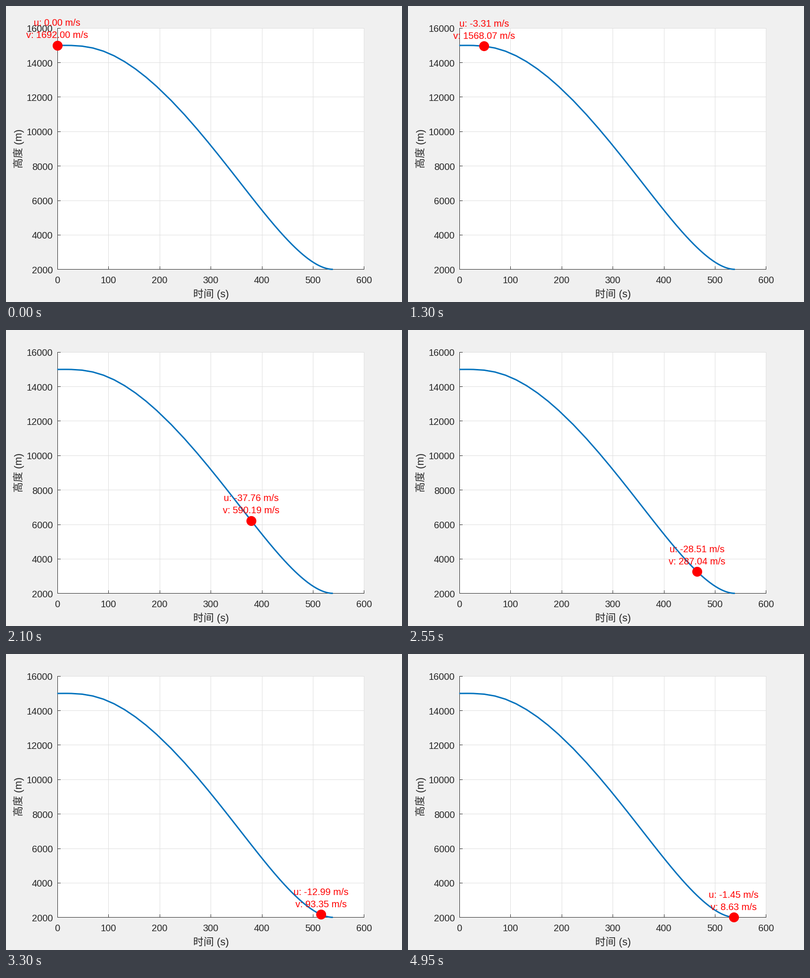
These frames come from a looping animation (840x630 px, 5 s). A matplotlib script:

```python
import matplotlib.pyplot as plt
import numpy as np
from matplotlib.animation import FuncAnimation
from matplotlib.patches import Rectangle

W, H, DPI = 840, 630, 100
PT = 72 / DPI                       # points per pixel
LEFT, RIGHT, TOP, BOTTOM = 108.7, 759.7, 47.25, 560.7
INK, RED, BLUE, GRID = "#262626", "#ff0000", "#0072bd", "#dedede"

plt.rcParams["font.family"] = ["Liberation Sans", "Noto Sans CJK JP"]


def to_x(t):
    return LEFT + (RIGHT - LEFT) * t / 600


def to_y(h):
    return BOTTOM - (BOTTOM - TOP) * (h - 2000) / 14000


def spline(t, kt, kv, first, last):
    """Smooth cubic spline through (kt, kv) with given end slopes."""
    span = np.diff(kt)
    chord = np.diff(kv) / span
    a, b = np.eye(len(kt)), np.zeros(len(kt))
    b[0], b[-1] = first, last
    for i in range(1, len(kt) - 1):
        p, q = 1 / span[i - 1], 1 / span[i]
        a[i, i - 1:i + 2] = p, 2 * (p + q), q
        b[i] = 3 * (p * chord[i - 1] + q * chord[i])
    d = np.linalg.solve(a, b)
    i = np.clip(np.searchsorted(kt, t, side="right") - 1, 0, len(kt) - 2)
    s = (t - kt[i]) / span[i]
    return (kv[i] * (1 + 2 * s) * (1 - s) ** 2 + kv[i + 1] * s * s * (3 - 2 * s)
            + span[i] * s * (1 - s) * (d[i] * (1 - s) - d[i + 1] * s))


# Key points of the descent: time, vertical speed, horizontal speed
KEY_T, KEY_U, KEY_V = np.array([
    (0, 0, 1692), (97, -12.2, 1439.5), (194.6, -27.17, 1166.27),
    (329.75, -37.6, 753.3), (464.9, -28.51, 287.04), (515.6, -12.99, 93.35),
    (531.3, -4.97, 31.33), (536.8, -1.45, 8.63), (538.9, 0, 0)]).T
END = KEY_T[-1]


def u_at(t):
    return spline(t, KEY_T, KEY_U, 0.042, 0.69)


def v_at(t):
    return spline(t, KEY_T, KEY_V, -2.493, -4.11)


def solver_times():
    """Steps grow fivefold every four points, then the time left decays."""
    cruise = KEY_T[2]
    n = np.arange(7)
    start = np.interp(np.arange(32), [*(4 * n), 32],
                      [*(0.0071 * (5.0 ** n - 1) / 4), cruise])
    stops = np.log(END - KEY_T[[2, 4, 5, 6, 7]])
    left = np.exp(np.interp(np.arange(32, 99), [32, 50, 65, 80, 98], stops))
    return np.concatenate([start, END - left, [END]])


times = solver_times()
u, v = u_at(times), v_at(times)
fine = np.linspace(0, END, 6000)
rate = u_at(fine)
drop = np.cumsum((rate[1:] + rate[:-1]) / 2 * np.diff(fine))
height = np.interp(times, fine, 15000 + np.concatenate([[0], drop]))
xs, ys = to_x(times), to_y(height)

fig = plt.figure(figsize=(W / DPI, H / DPI), dpi=DPI, facecolor="#f0f0f0")
ax = fig.add_axes([0, 0, 1, 1])
ax.set_xlim(0, W)
ax.set_ylim(H, 0)
ax.axis("off")


def line(x, y, color, width=1, z=2):
    ax.plot(x, y, color=color, lw=width * PT, zorder=z, snap=False,
            solid_capstyle="butt", solid_joinstyle="round")


def label(x, y, text, size=20, color=INK, ha="center", z=4, **kw):
    return ax.text(x, y, text, fontsize=size * PT, color=color, ha=ha,
                   va="baseline", zorder=z, **kw)


ax.add_patch(Rectangle((109, 47), 651, 514, color="white", lw=0, zorder=0))

for t in range(0, 601, 100):
    x = np.floor(to_x(t) + 0.3) + 0.5
    x = min(x, 759.5)
    line([x, x], [47, 561], GRID, z=1)
    line([x, x], [554, 561], INK)
    label(to_x(t), 590, str(t))

for h in range(2000, 16001, 2000):
    y = np.floor(to_y(h)) + 0.5
    line([109, 760], [y, y], GRID, z=1)
    line([109, 116], [y, y], INK)
    label(99.5, to_y(h) + 8, str(h), ha="right")

line([109.5, 109.5], [47, 561], INK)
line([109, 760], [560.5, 560.5], INK)
label(434.5, 620, "时间 (s)", 22)
label(34, 303.5, "高度 (m)", 22, rotation=90, rotation_mode="anchor")
line(xs, ys, BLUE, 3, z=3)

dot, = ax.plot([], [], "o", color=RED, ms=20 * PT, mew=1 * PT, zorder=5)
u_text = label(0, 0, "", color=RED, z=6)
v_text = label(0, 0, "", color=RED, z=6)


def draw(i):
    k = max(i - 1, 0)               # the opening pose is held twice as long
    x, y = xs[k], ys[k]
    dot.set_data([x], [y])
    u_text.set_position((x, y - 41.5))
    u_text.set_text(f"u: {u[k]:.2f} m/s")
    v_text.set_position((x, y - 15.5))
    v_text.set_text(f"v: {v[k]:.2f} m/s")
    return dot, u_text, v_text


anim = FuncAnimation(fig, draw, frames=100, interval=50, repeat=True,
                     repeat_delay=0)
plt.show()
```
